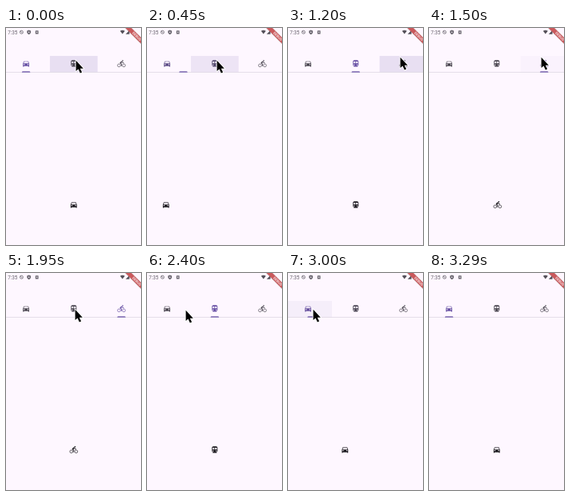
An HTML page that plays this animation: 169 px wide and 272 px high, repeating every 3890 ms.

```html
<!DOCTYPE html>
<html lang="en">
<head>
<meta charset="utf-8">
<title>Tab bar</title>
<style>
  html, body { margin: 0; width: 100%; height: 100%; overflow: hidden; background: #fef7ff; }
  svg { display: block; width: 100vw; height: 100vh; }
  text { font-family: Roboto, Arial, sans-serif; }
</style>
</head>
<body>
<svg viewBox="0 0 169 272">
  <defs>
    <path id="car" fill-rule="evenodd" d="M18.9 6C18.7 5.4 18.2 5 17.5 5h-11C5.8 5 5.3 5.4 5.1 6L3 12v8q0 1 1 1h1q1 0 1-1v-1h12v1q0 1 1 1h1q1 0 1-1v-8zM6.5 16a1.5 1.5 0 1 1 .01 0zM17.5 16a1.5 1.5 0 1 1 .01 0zM5 11l1.5-4.5h11L19 11z"/>
    <path id="train" fill-rule="evenodd" d="M12 2C7.6 2 4 2.5 4 6v9.5C4 17.4 5.6 19 7.5 19L6 20.5v.5h12v-.5L16.5 19c1.9 0 3.5-1.6 3.5-3.5V6c0-3.5-3.6-4-8-4zM7.5 17a1.5 1.5 0 1 1 .01 0zM16.5 17a1.5 1.5 0 1 1 .01 0zM11 11H6V6h5zM18 11h-5V6h5z"/>
    <g id="bike">
      <circle cx="15.5" cy="3.5" r="2"/>
      <g fill="none" stroke="currentColor" stroke-width="1.5">
        <circle cx="5" cy="17" r="4.25"/><circle cx="19" cy="17" r="4.25"/>
      </g>
      <path d="M10.8 10.5l2.4-2.4.8.8c1.3 1.3 3 2.1 5.1 2.1V9c-1.5 0-2.7-.6-3.6-1.5l-1.9-1.9c-.5-.4-1-.6-1.6-.6s-1.1.2-1.4.6L7.8 8.4c-.8.8-.8 2.1 0 2.8L11 14v5h2v-6.2z"/>
    </g>
  </defs>

  <g fill="#6b6770">
    <text x="2.2" y="7.5" font-size="6.3">7:35</text>
    <g fill="none" stroke="#6b6770" stroke-width=".8">
      <circle cx="19.4" cy="5.2" r="2"/><path d="M18 3.8l2.8 2.8"/>
    </g>
    <path d="M28.7 2.6l2.4 1v1.7q0 2-2.4 3-2.4-1-2.4-3V3.6z"/>
    <circle cx="28.7" cy="5.2" r=".8" fill="#fef7ff"/>
    <rect x="36.8" y="3.2" width="3.8" height="4.2" rx=".5"/>
    <circle cx="38.7" cy="5.2" r=".8" fill="#fef7ff"/>
  </g>
  <g fill="#55515a">
    <path d="M142.8 3.8q3-2.2 6 0l-3 3.8z"/>
    <path d="M149.8 7.7l4.7-4.7v4.7z"/>
    <path d="M157 3.2h.8v-.8h1.3v.8h.8v4.5H157z"/>
  </g>
  <g transform="translate(174.2 0) rotate(45)">
    <rect x="-18" y="11.8" width="36" height="6.2" fill="#000" opacity=".18"/>
    <rect x="-18" y="12.2" width="36" height="5.2" fill="#c9595c"/>
    <text y="16.3" font-size="4.4" font-weight="700" fill="#fbe4e6" text-anchor="middle">DEBUG</text>
  </g>

  <rect id="glow" y="35" width="59.7" height="20.5" fill="#6750a4"/>
  <rect y="55" width="169" height=".8" fill="#dfd9e4"/>
  <path id="mark" d="M-5.2 55.7v-.2q0-1.3 1.3-1.3h7.8q1.3 0 1.3 1.3v.2z" fill="#7965b0"/>
  <g id="tabs"></g>
  <g id="pages"></g>
  <path id="arrow" d="M1.6 .8V14l2.9-2.5 2.3 5.1 2.3-1-2.3-4.9h4z" stroke="#fff" stroke-width="1.7" paint-order="stroke"/>
</svg>
<script>
const LOOP = 3890, STEP = 150, LEAVE = 3140;
const PAGE = 179, TAB = 59.7, MID = 84.8, SLIDE = 300, FADE = 340, GLOW = .14;
const $ = id => document.getElementById(id);
const NAMES = ['car', 'train', 'bike'];

const taps = [
  { press: 0, slide: 384, tab: 1 },
  { press: 1190, slide: 1230, tab: 2 },
  { press: 2040, slide: 2050, tab: 1 },
  { press: 2800, slide: 2800, tab: 0 },
];
const home = { x: 86, y: 40 };
const glides = [
  { at: 725, len: 224, x: 139, y: 36, sag: 0 },
  { at: 1543, len: 417, x: 85, y: 45, sag: 9 },
  { at: 2170, len: 700, x: 30, y: 45, sag: 1 },
  { at: 3010, len: 200, x: 38, y: 90, sag: 0 },
];

const clamp = v => Math.min(1, Math.max(0, v));
const easeOut = v => 1 - (1 - clamp(v)) ** 3;
const mix = (a, b, k) => a + (b - a) * k;
const tabX = i => MID + (i - 1) * TAB;

// cubic-bezier(.25, .1, .25, 1)
function ease(x) {
  if (x <= 0 || x >= 1) return clamp(x);
  const curve = (a, b, u) => 3 * a * u * (1 - u) ** 2 + 3 * b * u * u * (1 - u) + u ** 3;
  let lo = 0, hi = 1;
  for (let i = 0; i < 24; i++) {
    const u = (lo + hi) / 2;
    if (curve(.25, .25, u) < x) lo = u; else hi = u;
  }
  return curve(.1, 1, lo);
}

function icon(name, parent) {
  const el = document.createElementNS('http://www.w3.org/2000/svg', 'use');
  el.setAttribute('href', '#' + name);
  parent.append(el);
  return el;
}

function place(el, x, y) {
  el.setAttribute('transform', `translate(${x} ${y}) scale(.435) translate(-12 -12)`);
}

function paint(el, color) {
  el.setAttribute('fill', color);
  el.setAttribute('color', color);
}

// 0 = idle grey, 1 = selected violet
function tint(k) {
  const idle = [73, 69, 79], on = [103, 80, 164];
  return `rgb(${idle.map((v, i) => Math.round(mix(v, on[i], k)))})`;
}

const tabs = NAMES.map(n => icon(n, $('tabs')));
const pages = NAMES.map(n => icon(n, $('pages')));
tabs.forEach((el, i) => place(el, tabX(i), 44.7));
pages.forEach(el => paint(el, '#1d1b20'));

function pointer(t) {
  let { x, y } = home;
  for (const g of glides) {
    const k = easeOut((t - g.at) / g.len);
    x = mix(x, g.x, k);
    y = mix(y, g.y, k) + g.sag * Math.sin(Math.PI * k);
  }
  return `translate(${Math.round(x)} ${Math.round(y)})`;
}

// Pictures change in steps, counted anew when the pointer leaves.
function hold(t) {
  const base = t < LEAVE ? 0 : LEAVE;
  return base + Math.floor((t - base) / STEP) * STEP;
}

function draw(t) {
  const pos = taps.reduce((p, tap) => mix(p, tap.tab, ease((t - tap.slide) / SLIDE)), 0);
  tabs.forEach((el, i) => paint(el, tint(clamp(1 - Math.abs(pos - i)))));
  pages.forEach((el, i) => place(el, MID + (i - pos) * PAGE, 221.6));
  $('mark').setAttribute('transform', `translate(${tabX(pos)} 0)`);

  const tap = taps.filter(p => p.press <= t).pop();
  $('glow').setAttribute('x', tabX(tap.tab) - TAB / 2);
  $('glow').setAttribute('opacity', GLOW * clamp(1 - (t - tap.slide) / FADE));

  $('arrow').setAttribute('transform', pointer(t));
  $('arrow').setAttribute('opacity', t < LEAVE + STEP ? 1 : 0);
}

const start = performance.now();
function tick(now) {
  draw(hold(Math.max(0, now - start) % LOOP));
  requestAnimationFrame(tick);
}
draw(0);
requestAnimationFrame(tick);
</script>
</body>
</html>
```
